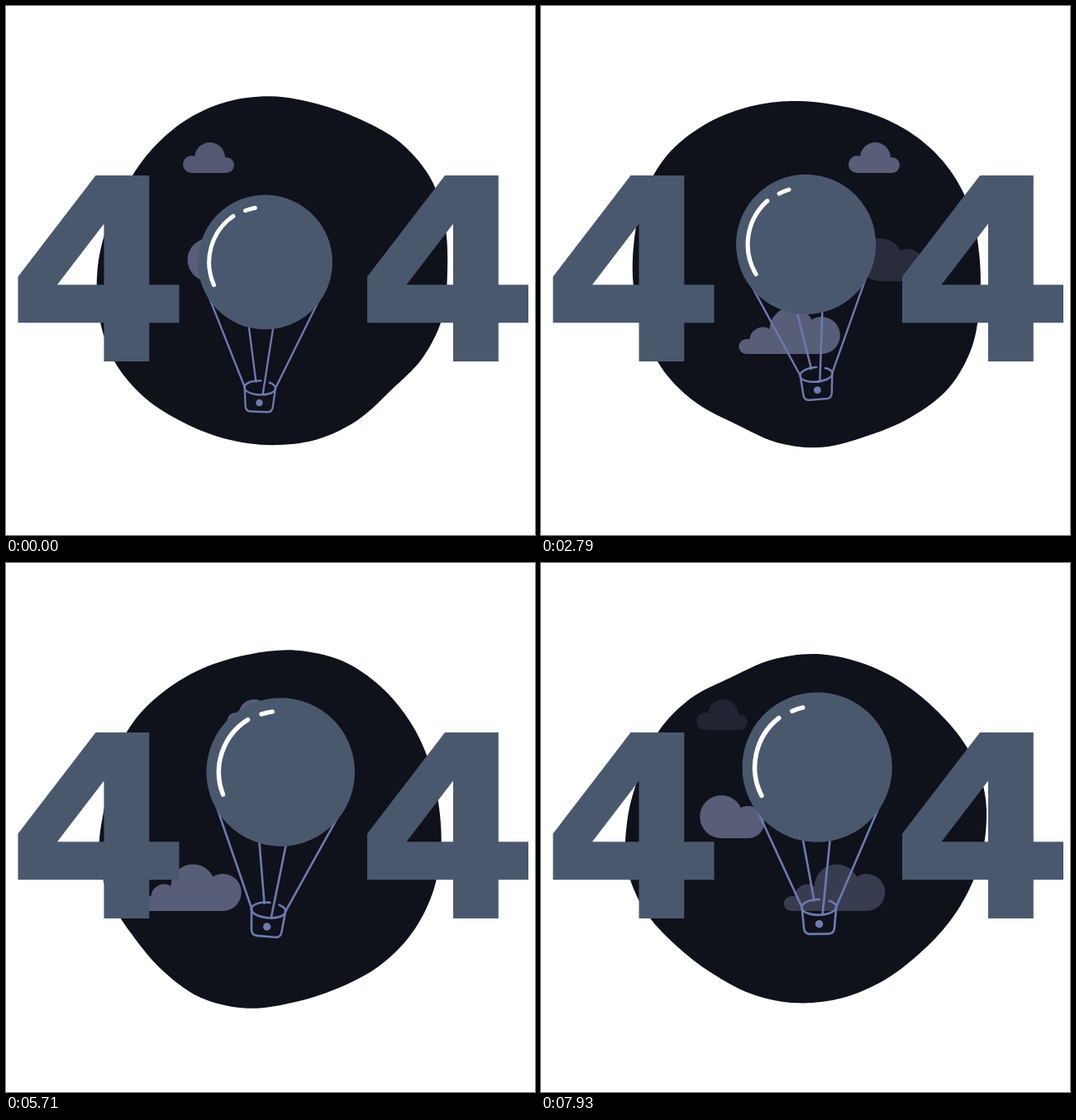
An HTML page that plays this animation: 640x640 px, repeating every 8000 ms.

```html
<!DOCTYPE html>
<html lang="en">
<head>
<meta charset="utf-8">
<title>404</title>
<style>
  html, body { margin: 0; width: 100%; height: 100%; overflow: hidden; background: #fff; }
  svg { display: block; width: 100%; height: 100%; }
  .slate { fill: #4a586e; }
  .cloud { fill: #585e78; }
  .line { fill: none; stroke: #6d7ab0; stroke-width: 2.4; stroke-linecap: round; stroke-linejoin: round; }
  .shine { fill: none; stroke: #fff; stroke-width: 5; stroke-linecap: round; }
</style>
</head>
<body>
<svg viewBox="0 0 640 640" role="img" aria-label="404">
  <path id="blob" fill="#0f111b"/>

  <g class="cloud" id="high">
    <circle cx="10.5" cy="191.5" r="10.5"/>
    <circle cx="32.5" cy="183.5" r="18.5"/>
    <circle cx="52.5" cy="192.5" r="9.5"/>
    <rect x="10.5" y="185" width="42" height="17"/>
  </g>
  <g class="cloud" id="middle">
    <circle cx="26" cy="307" r="26"/>
    <circle cx="58.5" cy="313.5" r="19.5"/>
    <rect x="26" y="310" width="32.5" height="23"/>
  </g>
  <g class="cloud" id="low">
    <circle cx="9" cy="412" r="9"/>
    <circle cx="29" cy="404.5" r="16"/>
    <circle cx="64" cy="391.5" r="27"/>
    <circle cx="100" cy="398.5" r="22.5"/>
    <rect x="9" y="403" width="91" height="18"/>
  </g>

  <!-- balloon, drawn around its own centre with radius 82 -->
  <g id="balloon">
    <g class="line">
      <path d="M-69 40L-19 153M69 40L18.5 153M-17 78L-5.5 146M13 78L3.4 161"/>
      <path d="M11 146.4A19 8.5 0 1 1 .5 144.7"/>
      <path d="M-19 153.5L-17.2 176Q-16.6 182.4 -10.5 182.4H9.5Q15.6 182.4 16.2 176L18.5 153.5"/>
    </g>
    <circle cx="-.4" cy="171.5" r="4.3" fill="#6d7ab0"/>
    <circle class="slate" r="82"/>
    <g class="shine" id="shine"></g>
  </g>

  <defs>
    <path id="four" fill-rule="evenodd" d="M108.5 205H173.3V337.3H209.5V383.3H173.3V430H118.5V383.3H14.5V327.5ZM118.5 263.5L62 337.3H118.5Z"/>
  </defs>
  <use class="slate" href="#four"/>
  <use class="slate" href="#four" x="422.5"/>
</svg>
<script>
const $ = id => document.getElementById(id);
const LOOP = 8, CYCLE = 7.2, RISE = 7.45, TAU = 2 * Math.PI;
const clamp = v => Math.max(0, Math.min(1, v));
const polar = (r, deg) => [r * Math.cos(deg * TAU / 360), r * Math.sin(deg * TAU / 360)];

// Smooth closed curve through evenly spaced radii
function blobPath(radii) {
  const n = radii.length;
  const pts = radii.map((r, i) => polar(r, i * 360 / n));
  const at = i => pts[(i + n) % n];
  const handle = (i, k) => at(i).map((v, a) => v + k * (at(i + 1)[a] - at(i - 1)[a]) / 6);
  const fmt = p => p.map(v => v.toFixed(2)).join(' ');
  return 'M' + fmt(at(0)) + pts.map((_, i) =>
    `C${fmt(handle(i, 1))} ${fmt(handle(i + 1, -1))} ${fmt(at(i + 1))}`).join('') + 'Z';
}
$('blob').setAttribute('d', blobPath([
  212.5, 214, 210.5, 204, 208, 211, 210.5, 210.5, 212, 217, 219.5, 216,
  211, 206.5, 204, 206.5, 210, 212, 211.5, 209.7, 212.5, 220, 222.5, 217]));

const arc = (r, from, to) => `<path d="M${polar(r, from)}A${r} ${r} 0 0 1 ${polar(r, to)}"/>`;
$('shine').innerHTML = arc(68.3, 153.8, 233) + arc(67.3, 246.8, 257.3);

// x is the left edge at time `when`; fades are [start, end] in seconds
const clouds = [
  { id: 'high', x: 372, when: 2.79, speed: 35.8, fadeIn: [1.2, 2.1], fadeOut: [7.12, 8.2] },
  { id: 'middle', x: 224.5, when: 7.07, speed: 37.5, fadeIn: [2.45, 3.4], fadeOut: [8.25, 9.2] },
  { id: 'low', x: 279, when: 1.29, speed: 26.4, fadeIn: [.2, 1.15], fadeOut: [6.2, 7.17] }
];

function drawCloud({ id, x, when, speed, fadeIn, fadeOut }, t) {
  const start = fadeIn[0] - .05;
  const u = start + ((t - start) % CYCLE + CYCLE) % CYCLE;
  const ramp = ([a, b]) => clamp((u - a) / (b - a));
  $(id).setAttribute('transform', `translate(${x - speed * (u - when)})`);
  $(id).setAttribute('opacity', ramp(fadeIn) * (1 - ramp(fadeOut)));
}

function draw(t) {
  $('blob').setAttribute('transform', `translate(321.5 320.7) rotate(${t * 180 / CYCLE})`);
  clouds.forEach(c => drawCloud(c, t));

  const rise = (1 - Math.cos(Math.PI * (t + .15) / RISE)) / 2;
  const swing = -5 * Math.cos(TAU * (t - 2.33) / CYCLE);
  $('balloon').setAttribute('transform',
    `translate(${313.5 + 21 * rise} ${310 - 64 * rise}) rotate(${swing}) scale(${(81.4 + 9.4 * rise) / 82})`);
}

function tick(now) {
  draw(now / 1000 % LOOP);
  requestAnimationFrame(tick);
}
draw(0);
requestAnimationFrame(tick);
</script>
</body>
</html>
```
